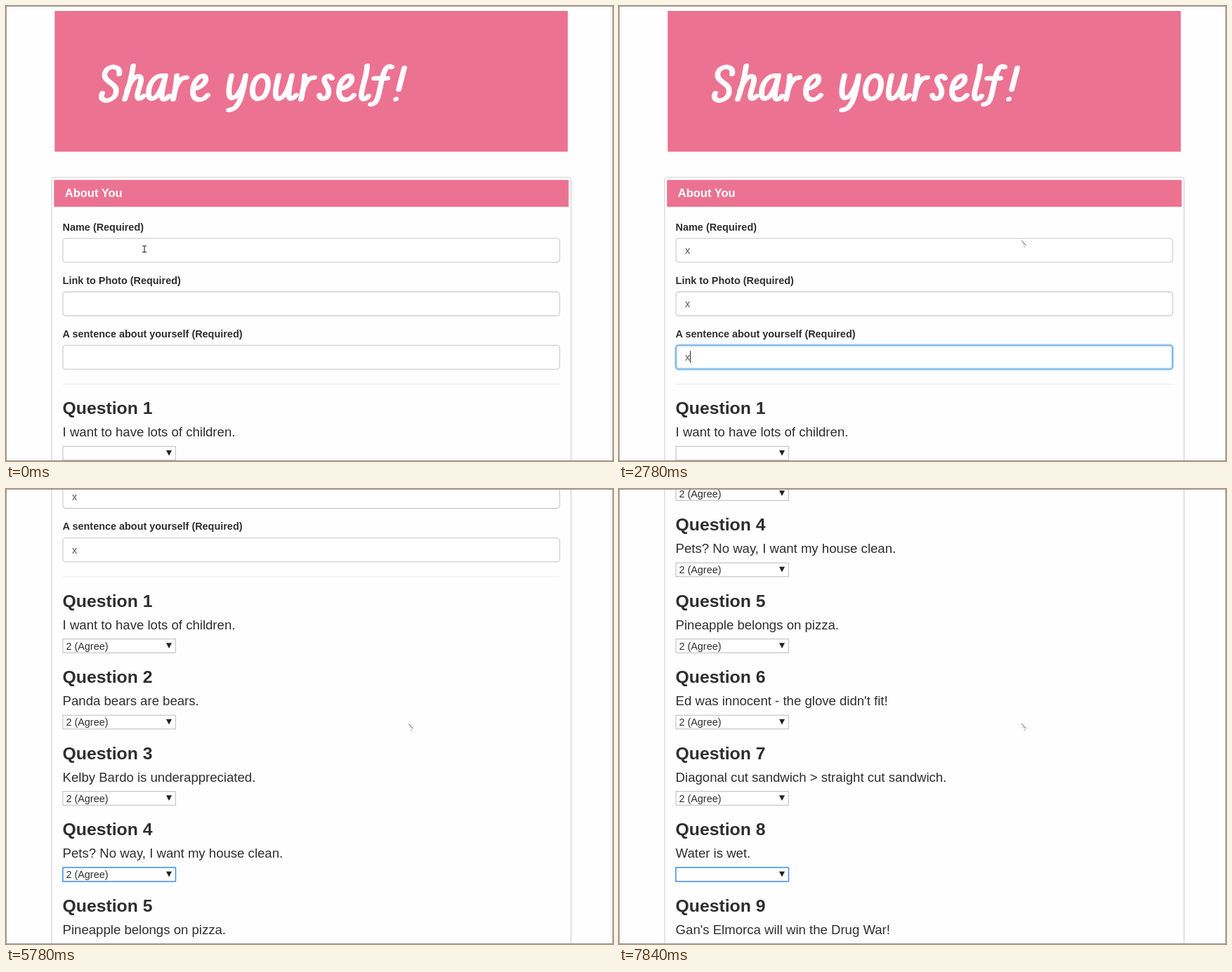
These frames come from a looping animation (864x648 px, 8 s). An HTML page:

```html
<!DOCTYPE html>
<html lang="en">
<head>
<meta charset="utf-8">
<title>Share yourself!</title>
<style>
  html, body { margin: 0; width: 100%; height: 100%; overflow: hidden; background: #fefefe; }
  svg { display: block; width: 864px; height: 648px; }
  text { font-family: "Liberation Sans", Arial, sans-serif; fill: #2e2e2e; }
  .bar { fill: #ec7292; }
  .title { font-size: 16.5px; font-weight: 700; fill: #fff; }
  .label { font-size: 14.43px; font-weight: 700; }
  .head { font-size: 24.75px; font-weight: 700; }
  .ask { font-size: 18.58px; }
  .pick { font-size: 14.43px; }
  .typed { font-size: 14.43px; fill: #555; }
  .box { fill: #fff; stroke: #c6c6c6; stroke-width: 1.1; }
  .sel { fill: #fff; stroke: #b9b9b9; }
  .ring { fill: none; stroke: #4a95f2; stroke-width: 1.5; }
  .glow rect { fill: none; stroke: #66afe9; }
  .script { fill: none; stroke: #fff; stroke-width: 5.8; stroke-linecap: round; stroke-linejoin: round; }
</style>
</head>
<body>
<svg id="stage" viewBox="0 0 864 648"></svg>
<script>
const LOOP = 8000;
const LEFT = 80.6;
const FIELD_GAP = 76.1;
const ASK_GAP = 108.5;

const labels = ["Name", "Link to Photo", "A sentence about yourself"];
const asks = [
  "I want to have lots of children.",
  "Panda bears are bears.",
  "Kelby Bardo is underappreciated.",
  "Pets? No way, I want my house clean.",
  "Pineapple belongs on pizza.",
  "Ed was innocent - the glove didn't fit!",
  "Diagonal cut sandwich > straight cut sandwich.",
  "Water is wet.",
  "Gan's Elmorca will win the Drug War!"
];

// Pen strokes of the banner lettering; r and e are used twice.
const penR = "M243 99C243 112 240 122 238 133M240 122C243 110 249 101 257 102";
const penE = "M267 118C276 117 286 110 284 102C281 95 267 103 266 120C265 137 280 136 287 127";
const lettering = [
  ["M161 97C164 86 150 84 143 91C136 101 144 106 151 111C160 117 158 129 149 133C141 137 133 133 137 124"],
  ["M181 85C179 100 175 116 169 133M172 121C177 106 186 97 191 101C195 105 188 118 187 127C187 134 192 133 196 128"],
  ["M226 100C214 96 203 109 203 124C203 135 211 134 217 125C222 117 225 108 227 99C224 112 221 124 222 130C223 135 229 133 232 128"],
  [penR],
  [penE],
  ["M321 99C318 111 314 130 322 131C330 131 338 114 341 99C338 120 333 149 317 148"],
  ["M365 99C356 99 350 111 351 123C352 136 366 135 371 122C375 110 373 100 365 99"],
  ["M388 99C385 112 380 131 388 132C396 132 403 117 407 99C404 112 401 126 403 130C405 134 410 131 413 127"],
  [penR, 182],
  ["M464 103C461 98 453 99 453 106C454 113 461 115 459 125C457 134 447 134 446 127"],
  [penE, 208],
  ["M514 85C514 100 505 118 506 128C507 135 513 133 516 128"],
  ["M549 87C542 83 538 92 535 105C531 122 530 141 519 140M524 103L543 103"],
  ["M567 88L559 119M555 132.5L555 132.6"]
];

// Each step changes part of the state and holds until the next.
const steps = [
  [0, { scroll: 0, focus: 0, values: 0, typed: 0, glow: [0, 0, 0], caret: null, cursor: ["beam", 197, 346] }],
  [300, { glow: [1, 0, 0], caret: [0, 0] }],
  [590, { cursor: ["beam", 318, 338] }],
  [727, { cursor: ["arrow", 462, 281] }],
  [863, { cursor: ["arrow", 572, 333], caret: null }],
  [1000, { cursor: ["trace", 572, 333], typed: 1, caret: [0, 1] }],
  [1530, { caret: null }],
  [1810, { glow: [.5, .5, 0], caret: [1, 0] }],
  [1930, { glow: [0, 1, 0] }],
  [2210, { typed: 2, caret: [1, 1] }],
  [2510, { glow: [0, .5, .5], caret: [2, 0] }],
  [2640, { glow: [0, 0, 1] }],
  [2780, { typed: 3, caret: [2, 1] }],
  [3180, { glow: [0, 0, .4], caret: null, focus: 1 }],
  [3340, { glow: [0, 0, 0] }],
  [4220, { values: 1 }],
  [4490, { focus: 2, scroll: 413.5 }],
  [4770, { values: 2 }],
  [5020, { focus: 3 }],
  [5260, { values: 3 }],
  [5510, { focus: 4 }],
  [5780, { values: 4 }],
  [6060, { focus: 5, scroll: 434.5 }],
  [6330, { values: 5 }],
  [6560, { focus: 6, scroll: 847.5 }],
  [6970, { values: 6 }],
  [7200, { focus: 7 }],
  [7590, { values: 7 }],
  [7840, { focus: 8 }]
];

const text = (cls, x, y, s) => `<text class="${cls}" x="${x}" y="${y}">${s.replace(/>/g, "&gt;")}</text>`;
const rect = (cls, x, y, w, h, more = "") =>
  `<rect class="${cls}" x="${x}" y="${y}" width="${w}" height="${h}" ${more}/>`;

function drawTitle() {
  const strokes = lettering.map(([d, dx = 0]) => `<path d="${d}" transform="translate(${dx})"/>`).join("");
  // Two shifted passes give the broad-nib contrast.
  return `<g role="img" aria-label="Share yourself!" class="script">` +
    [-1, 1].map(dx => `<g transform="translate(${dx} ${-dx * .3})">${strokes}</g>`).join("") + `</g>`;
}

function drawField(name, i) {
  const y = 331 + i * FIELD_GAP;
  const ring = (w, o) => rect("", 81, y, 707, 34, `rx="4" stroke-width="${w}" opacity="${o}"`);
  return text("label", LEFT, 319.5 + i * FIELD_GAP, name + " (Required)") +
    rect("box", 81, y, 707, 34, `rx="4"`) +
    `<g class="glow">${ring(5.5, .16)}${ring(3.2, .22)}${ring(1.3, 1)}</g>` +
    `<g class="entry">${text("typed", 94, y + 22, "x")}</g>`;
}

function drawAsk(ask, i) {
  return `<g transform="translate(0 ${i * ASK_GAP})">` +
    text("head", LEFT, 581.3, "Question " + (i + 1)) +
    text("ask", LEFT, 613.3, ask) +
    rect("sel", 81, 627.2, 160.3, 19.6) +
    rect("ring", 80.8, 627, 160.7, 20, `rx=".5"`) +
    `<g class="value">${text("pick", 85.4, 642.2, "2 (Agree)")}</g>` +
    `<path d="M228 632.8h8l-4 7.6z" fill="#222"/></g>`;
}

const stage = document.getElementById("stage");
stage.innerHTML =
  `<g id="page">` +
    rect("bar", 69.3, 7, 730.4, 200.5) + drawTitle() +
    rect("", 65, 244, 739.3, 1400, `rx="4" fill="#fefefe" stroke="#d2d2d2" stroke-width="1.2"`) +
    rect("bar", 68.3, 247.7, 732.5, 38.3) +
    text("title", 83.8, 272.2, "About You") +
    labels.map(drawField).join("") +
    rect("", 81, 538, 707, 1, `fill="#e9e9e9"`) +
    asks.map(drawAsk).join("") +
    rect("", 0, 0, 1, 17, `id="caret" fill="#222"`) +
  `</g>
  <g id="beam"><path d="M-3 -4.2h2.3l.7 .6l.7-.6h2.3M0-3.6V4M-3 4.5h2.3l.7-.6l.7 .6h2.3" fill="none" stroke="#222" stroke-width="1.1"/></g>
  <g id="arrow"><path d="M0 0V14.5L3.4 11.4L5.7 16.4L7.7 15.5L5.5 10.7H10Z" fill="#fff" stroke="#222" stroke-width=".9"/></g>
  <g id="trace" fill="none"><path d="M1 1.4L7.4 8" stroke="#8a8a8a" stroke-width="1.1"/><path d="M2.4 6.8l2-.8M4 9.2l1.6 .3l-.8 1.6" stroke="#b0b0b0"/></g>` +
  rect("", .5, .5, 863, 647, `fill="none" stroke="#9a9a9a"`);

const all = cls => [...stage.querySelectorAll("." + cls)];
const byId = id => document.getElementById(id);
const show = (el, on) => { el.style.visibility = on ? "visible" : "hidden"; };
const move = (el, x, y) => el.setAttribute("transform", `translate(${x} ${y})`);
const glows = all("glow"), entries = all("entry"), rings = all("ring"), values = all("value");
const page = byId("page"), caret = byId("caret");
const cursors = ["beam", "arrow", "trace"].map(byId);

function render(t) {
  const s = Object.assign({}, ...steps.filter(([at]) => at <= t).map(([, change]) => change));
  move(page, 0, -s.scroll);
  glows.forEach((el, i) => { el.style.opacity = s.glow[i]; });
  entries.forEach((el, i) => show(el, i < s.typed));
  rings.forEach((el, i) => show(el, i + 1 === s.focus));
  values.forEach((el, i) => show(el, i < s.values));
  show(caret, s.caret);
  if (s.caret) move(caret, 94 + s.caret[1] * 7, 339 + s.caret[0] * FIELD_GAP);
  const [kind, x, y] = s.cursor;
  cursors.forEach(el => {
    show(el, el.id === kind);
    move(el, x, y);
  });
}

const start = performance.now();
function tick() {
  render((performance.now() - start) % LOOP);
  requestAnimationFrame(tick);
}
tick();
</script>
</body>
</html>
```
